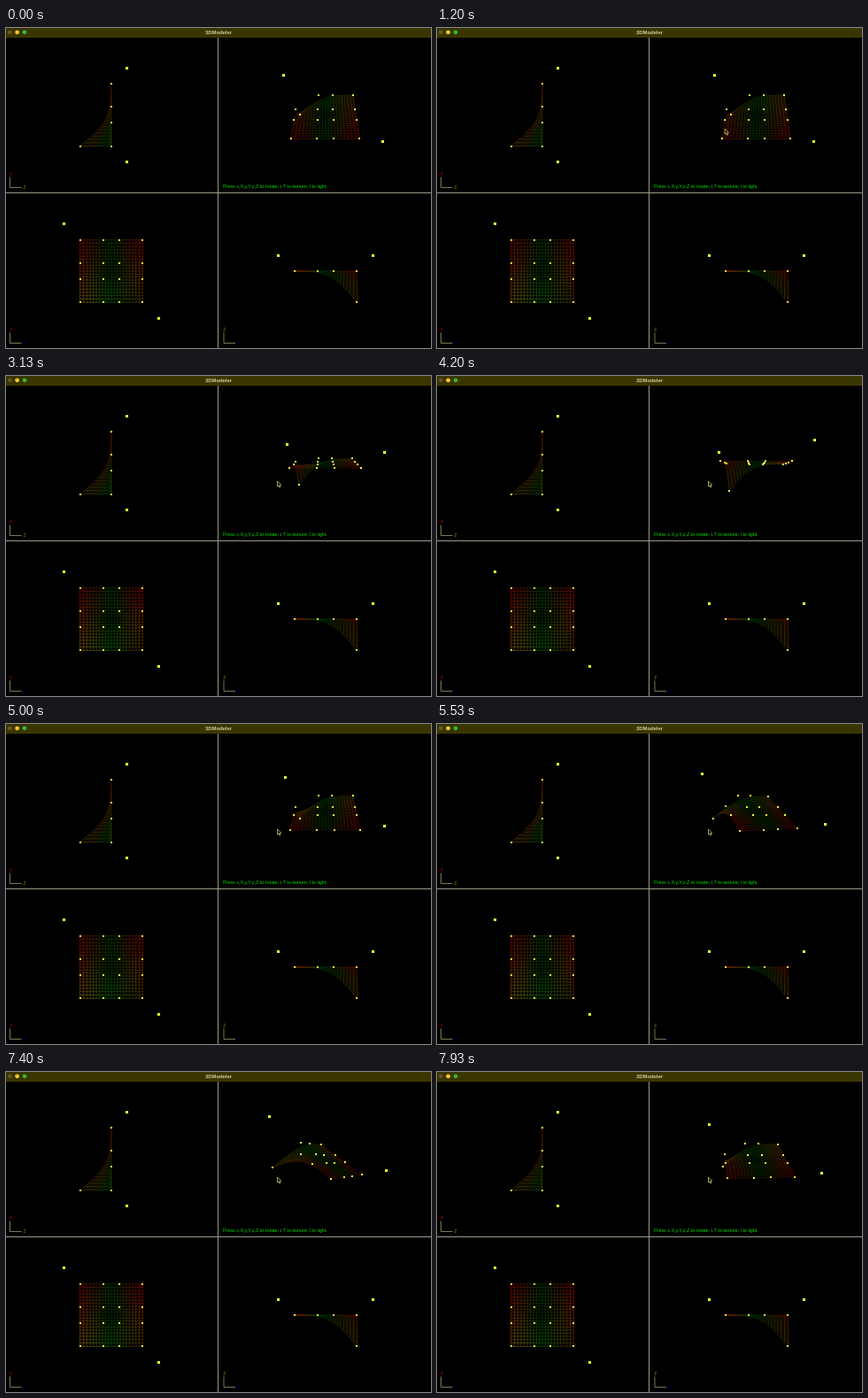
Animation of 480 by 362 pixels, one loop 8 s. Source, as an HTML page with a canvas:

```html
<!DOCTYPE html>
<html>
<head>
<meta charset="utf-8">
<title>3DModeler</title>
<style>
  html, body { margin: 0; width: 480px; height: 362px; overflow: hidden; background: #000; }
  canvas { display: block; }
</style>
</head>
<body>
<canvas id="stage" width="480" height="362"></canvas>
<script>
const ctx = document.getElementById('stage').getContext('2d');
const LOOP = 8000, GRID = 20, UNIT = 17.7;
const FOCAL = 241.8, DISTANCE = 14;
const KNOTS = [-2, -0.5, 0.5, 2];
const LIGHTS = [[-3, 3, 1], [3, -3, 1]];

// A 4x4 Bezier patch, flat except for one corner pulled back.
const controls = KNOTS.flatMap(x => KNOTS.map(y => [x, y, x === 2 && y === -2 ? -2 : 0]));
const bernstein = t => [(1 - t) ** 3, 3 * t * (1 - t) ** 2, 3 * t * t * (1 - t), t ** 3];

function surfacePoint(p, q) {
  const bp = bernstein(p), bq = bernstein(q), out = [0, 0, 0];
  controls.forEach((c, n) => {
    const weight = bp[n >> 2] * bq[n & 3];
    for (let k = 0; k < 3; k++) out[k] += weight * c[k];
  });
  return out;
}

function surfaceColor(p, q) {
  const edge = Math.abs(2 * p - 1);
  const core = Math.exp(-((p - 0.5) ** 2 + (q - 0.5) ** 2) * 30);
  const light = 1 - 0.4 * core;
  const red = 215 * edge * light;
  const green = (165 * (1 - edge) * (1 - 0.4 * q) + 140 * edge * (1 - q)) * light;
  return `rgb(${red | 0},${green | 0},0)`;
}

const subtract = (a, b) => a.map((value, k) => value - b[k]);

function area(a, b) {
  const [ax, ay, az = 0] = a, [bx, by, bz = 0] = b;
  return Math.hypot(ay * bz - az * by, az * bx - ax * bz, ax * by - ay * bx);
}

// Each segment keeps a point across from it, to tell how far its cell faces the viewer.
const mesh = [];
function addSegment(p0, q0, p1, q1) {
  const dp = (q1 - q0) * (p0 < 0.5 ? 1 : -1), dq = (p1 - p0) * (q0 < 0.5 ? 1 : -1);
  const from = surfacePoint(p0, q0), to = surfacePoint(p1, q1);
  const across = surfacePoint(p0 + dp, q0 + dq);
  mesh.push({
    from, to, across,
    area: area(subtract(to, from), subtract(across, from)) * UNIT ** 2,
    color: surfaceColor((p0 + p1) / 2, (q0 + q1) / 2)
  });
}
for (let i = 0; i <= GRID; i++)
  for (let j = 0; j < GRID; j++) {
    const a = i / GRID, b = j / GRID, c = (j + 1) / GRID;
    addSegment(a, b, a, c);
    addSegment(b, a, c, a);
  }

const sideView = ([x, y, z]) => [119 + UNIT * z, 98.2 - UNIT * y];
const frontView = ([x, y, z]) => [119 + UNIT * x, 275 - UNIT * y];
const topView = ([x, y, z]) => [361 + UNIT * x, 275 - UNIT * z];

function perspectiveView(tilt, turn) {
  const rad = Math.PI / 180;
  const ct = Math.cos(tilt * rad), st = Math.sin(tilt * rad);
  const cp = Math.cos(turn * rad), sp = Math.sin(turn * rad);
  return ([x, y, z]) => {
    const up = -y * ct + z * st, near = y * st + z * ct;
    const scale = FOCAL / (DISTANCE - (near * cp + x * sp));
    return [360.7 + scale * (near * sp - x * cp), 98.2 - scale * up];
  };
}

// Key presses so far: one at once, then auto-repeat after a delay.
function presses(t, start, max) {
  if (t < start) return 0;
  return Math.min(max, 1 + Math.max(0, Math.floor((t - start - 225) * 0.03) + 1));
}

function line(x0, y0, x1, y1, color, width) {
  ctx.strokeStyle = color;
  ctx.lineWidth = width;
  ctx.beginPath();
  ctx.moveTo(x0, y0);
  ctx.lineTo(x1, y1);
  ctx.stroke();
}

function text(str, x, y, size, color, weight = '', align = 'left') {
  ctx.font = `${weight} ${size}px "Liberation Sans", Arial, sans-serif`;
  ctx.fillStyle = color;
  ctx.textAlign = align;
  ctx.fillText(str, x, y);
}

function drawModel(project) {
  for (const s of mesh) {
    const from = project(s.from), to = project(s.to);
    const facing = area(subtract(to, from), subtract(project(s.across), from)) / s.area;
    ctx.globalAlpha = 0.12 + 0.68 * Math.min(1, facing);
    line(...from, ...to, s.color, 0.5);
  }
  ctx.globalAlpha = 1;
  const dots = (points, size) => points.map(project).forEach(([x, y]) =>
    ctx.fillRect(Math.round(x - size / 2), Math.round(y - size / 2), size, size));
  ctx.fillStyle = '#ffff33';
  dots(controls, 2);
  dots(LIGHTS, 3);
}

function drawAxes(x, y, vertical, horizontal, vColor, hColor) {
  line(x, y - 12, x, y, '#999966', 0.8);
  line(x, y, x + 13, y, '#999966', 0.8);
  text(vertical, x - 0.8, y - 13.5, 4.8, vColor);
  text(horizontal, x + 15, y + 1.6, 4.8, hColor);
}

function drawWindow() {
  ctx.fillStyle = '#3a3600';
  ctx.fillRect(0, 0, 480, 11);
  [['#66552a', 4.3], ['#ffcc22', 12.6], ['#33bb33', 21]].forEach(([color, x]) => {
    ctx.fillStyle = color;
    ctx.beginPath();
    ctx.arc(x, 4.8, 2.4, 0, 7);
    ctx.fill();
  });
  text('3DModeler', 240, 6.7, 5.9, '#cccc99', 'bold', 'center');
  line(239.5, 11, 239.5, 362, '#9a9a88', 1);
  line(0, 186.5, 480, 186.5, '#9a9a88', 1);
  drawAxes(4.5, 180.5, 'Y', 'Z', '#dd0000', '#55aa00');
  drawAxes(4.5, 356.5, 'Y', 'X', '#dd0000', '#000077');
  drawAxes(246, 356.5, 'Z', 'X', '#55aa00', '#000077');
  text('Press x,X,y,Y,z,Z to rotate; t,T to texture; l to light.', 245, 180.8, 5.4, '#00dd00');
}

function drawCursor(t) {
  if (t < 730) return;
  const left = (1 - Math.min(1, (t - 730) / 700)) ** 2;
  ctx.save();
  ctx.translate(306.5 + 175 * left, 119 - 45 * left);
  ctx.beginPath();
  [[0, 0], [0, 6], [1.4, 4.8], [2.4, 7], [3.4, 6.5], [2.5, 4.4], [4.2, 4.2]]
    .forEach(p => ctx.lineTo(...p));
  ctx.closePath();
  ctx.fillStyle = '#000';
  ctx.fill();
  ctx.strokeStyle = '#cccc77';
  ctx.lineWidth = 0.8;
  ctx.stroke();
  ctx.restore();
}

function draw(t) {
  const tilt = 45 + 3 * (presses(t, 2570, 16) - presses(t, 4300, 12));
  const turn = 3 * (presses(t, 5020, 20) - presses(t, 7200, 16));
  ctx.fillStyle = '#000';
  ctx.fillRect(0, 0, 480, 362);
  [sideView, frontView, topView, perspectiveView(tilt, turn)].forEach(drawModel);
  drawWindow();
  drawCursor(t);
}

const start = performance.now();
function tick() {
  draw((performance.now() - start) % LOOP);
  requestAnimationFrame(tick);
}
tick();
</script>
</body>
</html>
```
